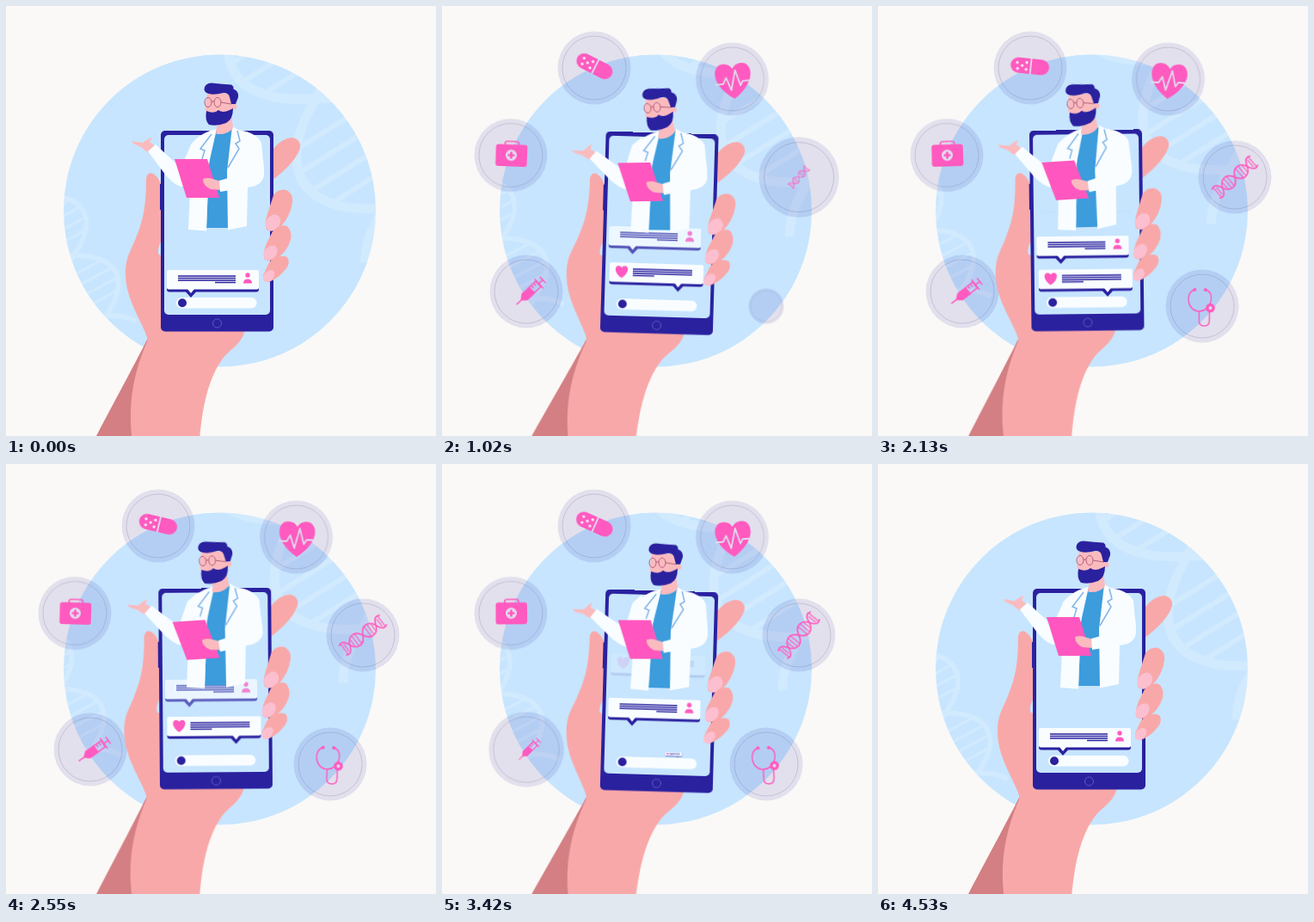
Animation of 500 by 500 pixels, one loop 4560 ms. Source, as an HTML page without scripts:

```html
<!DOCTYPE html>
<html lang="en">
<head>
<meta charset="utf-8">
<title>Online doctor</title>
<style>
  html, body { margin: 0; width: 100%; height: 100%; overflow: hidden; background: #faf9f7; }
  svg { display: block; width: 100%; height: 100%; }

  .navy { fill: #2a219f; }
  .pink { fill: #ff5abf; }
  .skin { fill: #f9a8a9; }
  .face { fill: #fabbbf; }
  .nail { fill: #fcbfd0; }
  .coat { fill: #f9fdff; }
  .pale { fill: #e0dcee; }
  .line { fill: none; stroke: #ff5abf; stroke-width: 1.7; stroke-linecap: round; stroke-linejoin: round; }
  .cut { fill: none; stroke: #e0dcee; stroke-width: 1.8; stroke-linejoin: round; }
  .text { fill: none; stroke: #2a219f; stroke-width: 1.7; }
  .seam { fill: none; stroke: #82b4e8; stroke-width: 1.5; }
  .helix { fill: none; stroke: #fff; }

  .drift, .sway, .torso, .head, .arm, .forearm, .bubble, .disc, .icon, .wobble {
    animation: 4560ms linear infinite both;
  }
  .drift { animation-name: drift; }
  .sway { animation-name: sway; animation-timing-function: ease-in-out; transform-origin: 165px 510px; }
  .torso { animation-name: torso; transform-origin: 245px 260px; }
  .head { animation-name: head; transform-origin: 255px 148px; }
  .arm { animation-name: arm; transform-origin: 215px 185px; }
  .forearm { animation-name: forearm; transform-origin: 290px 200px; }
  .bubble { animation-name: chat; animation-timing-function: ease-out; animation-delay: calc((var(--n) * 760 - 4330) * 1ms); }
  .bubble.last { animation-name: chat-last; }
  .disc { animation-name: disc; animation-timing-function: ease-in-out; animation-delay: var(--d); }
  .icon { animation-name: icon; animation-timing-function: ease-in-out; animation-delay: var(--d); }
  .wobble { animation-name: wobble; animation-timing-function: ease-in-out; animation-delay: var(--lag, 0ms); }

  @keyframes drift {
    0%, 100% { transform: none; }
    12.5% { transform: translate(calc(var(--k) * -8px), calc(var(--k) * -22px)); }
    33.5% { transform: translate(calc(var(--k) * -20px), calc(var(--k) * -40px)); }
    46.7% { transform: translate(calc(var(--k) * -30px), calc(var(--k) * -45px)); }
    63.8% { transform: translate(calc(var(--k) * -22px), calc(var(--k) * -42px)); }
    75% { transform: translate(calc(var(--k) * -22px), calc(var(--k) * -35px)); }
  }
  @keyframes sway {
    0%, 100% { transform: rotate(0deg); }
    27.4%, 31.2% { transform: rotate(1.8deg); }
    48.7% { transform: rotate(-.7deg); }
    81.1% { transform: rotate(1.8deg); }
  }
  @keyframes torso {
    0%, 12.5%, 75%, 100% { transform: rotate(0deg); }
    33.5% { transform: rotate(-2deg); }
    46.7% { transform: rotate(-1deg); }
    63.8% { transform: rotate(1deg); }
  }
  @keyframes head {
    0%, 100% { transform: rotate(0deg); }
    12.5% { transform: translate(-1px, 2px) rotate(-6.5deg); }
    33.5% { transform: translate(-1px, 2px) rotate(-7deg); }
    46.7% { transform: translate(-2px, 1px) rotate(-3.5deg); }
    63.8% { transform: translateX(-1.5px) rotate(-2.3deg); }
    75% { transform: rotate(-2deg); }
  }
  @keyframes arm {
    0%, 100% { transform: rotate(0deg); }
    12.5%, 33.5% { transform: rotate(-8deg); }
    46.7% { transform: rotate(-2deg); }
    63.8% { transform: rotate(-8.5deg); }
    75% { transform: rotate(-10deg); }
  }
  @keyframes forearm {
    0%, 100% { transform: rotate(0deg); }
    12.5% { transform: translateX(1px) rotate(-3deg); }
    33.5% { transform: rotate(0deg); }
    46.7% { transform: rotate(-2deg); }
    63.8% { transform: translate(2px, 1px) rotate(-4.5deg); }
    75% { transform: rotate(-1.5deg); }
  }
  @keyframes chat {
    0%, 2.85% { transform: translateY(0) scale(0); opacity: 1; }
    7.02%, 16.67% { transform: translateY(0) scale(1); opacity: 1; }
    20.83%, 33.33% { transform: translateY(-38.5px) scale(1); opacity: 1; }
    37.5% { transform: translateY(-91px) scale(1); opacity: .07; }
    45%, 100% { transform: translateY(-91px) scale(1); opacity: 0; }
  }
  @keyframes chat-last {
    0%, 2.85% { transform: translateY(0) scale(0); opacity: 1; }
    7.02%, 16.67% { transform: translateY(0) scale(1); opacity: 1; }
    20.83%, 22% { transform: translateY(-38.5px) scale(1); opacity: 1; }
    26% { transform: translateY(-91px) scale(1); opacity: .07; }
    28.2%, 100% { transform: translateY(-91px) scale(1); opacity: 0; }
  }
  @keyframes disc {
    0% { transform: scale(0); }
    5.7% { transform: scale(1.1); }
    10.3%, 72.6% { transform: scale(1); }
    75.2% { transform: scale(1.04); }
    79.8%, 100% { transform: scale(0); }
  }
  @keyframes icon {
    0%, 4.6% { transform: scale(0); }
    8.3% { transform: scale(1.1); }
    11%, 72.5% { transform: scale(1); }
    78%, 100% { transform: scale(0); }
  }
  @keyframes wobble {
    0%, 100% { transform: rotate(0deg); }
    24.1%, 69.3% { transform: rotate(var(--a)); }
    46.7%, 91.9% { transform: rotate(calc(var(--a) * -1)); }
  }
</style>
</head>
<body>
<svg viewBox="0 0 500 500">
  <defs>
    <clipPath id="round"><circle cx="248.5" cy="238" r="181.5"/></clipPath>

    <g id="helix" class="helix">
      <g stroke-width="11">
        <path d="M-300 0C-255 85-195 85-150 0S-45-85 0 0 105 85 150 0Q168-38 192-52"/>
        <path d="M-300 0C-255-85-195-85-150 0S-45 85 0 0 105-85 150 0Q168 38 192 52"/>
      </g>
      <path stroke-width="6" d="M-112-52V52M-87-60V60M-62-60V60M-37-52V52M38-52V52M63-60V60M88-60V60M113-52V52"/>
    </g>

    <path id="heart" d="M0 20C-26 3-23-19-10-19Q-3-19 0-13Q3-19 10-19C23-19 26 3 0 20Z"/>

    <!-- Chat bubbles have their pointer tip at 0,0 -->
    <g id="note">
      <path class="navy" d="M-28-29H79V-8.500Q79-5.500 76-5.500H6L0 1-6-5.500H-25Q-28-5.500-28-8.500Z"/>
      <rect class="coat" x="-28" y="-31" width="107" height="22.500" rx="2"/>
      <path class="coat" d="M-4-9H4L0-4Z"/>
      <path class="text" d="M-15-24H52M-15-21.500H52M-15-19H52M28-16.500H52"/>
      <circle class="pink" cx="66" cy="-25" r="2.700"/>
      <path class="pink" d="M61-15.500Q61-20.500 66-20.500T71-15.500Z"/>
    </g>
    <g id="reply">
      <path class="navy" d="M-80-29H29V-8.500Q29-5.500 26-5.500H6L0 1-6-5.500H-77Q-80-5.500-80-8.500Z"/>
      <rect class="coat" x="-80" y="-31" width="109" height="22.500" rx="2"/>
      <path class="coat" d="M-4-9H4L0-4Z"/>
      <path class="text" d="M-53-24H16M-53-21.500H16M-53-19H16M-53-16.500H-28"/>
      <use href="#heart" class="pink" transform="translate(-66 -20.500)scale(.36)"/>
    </g>

    <g id="plate">
      <circle r="42.500" fill="#1c0c96" opacity=".1"/>
      <circle r="37" fill="none" stroke="#59557f" stroke-width=".8" opacity=".28"/>
    </g>
  </defs>

  <rect width="500" height="500" fill="#faf9f7"/>
  <circle cx="248.500" cy="238" r="181.500" fill="#c7e5fe"/>
  <g clip-path="url(#round)" opacity=".2">
    <g class="drift" style="--k:1"><use href="#helix" transform="translate(360 108)rotate(58)"/></g>
    <g class="drift" style="--k:.65"><use href="#helix" transform="translate(79 290)rotate(62)scale(.53)"/></g>
  </g>

  <!-- Badges -->
  <g transform="translate(98 332)" style="--d:30ms">
    <use href="#plate" class="disc"/>
    <g class="icon"><g class="wobble" style="--a:-5deg;--lag:-4170ms"><g transform="translate(5 0)rotate(-40)scale(.88)">
      <path class="line" d="M-25 0H-16M2-5H14V5H2M6-5V-1M10-5V-1M15-8V8M15 0H22M22-5V5"/>
      <path class="pink" d="M-18 0L-11-6H3V6H-11Z"/>
    </g></g></g>
  </g>
  <g transform="translate(80 173.500)" style="--d:195ms">
    <use href="#plate" class="disc"/>
    <g class="icon"><g class="wobble" style="--a:2.500deg;--lag:-300ms">
      <path class="line" d="M-7-12V-14Q-7-16-4-16H6Q9-16 9-14V-12"/>
      <rect class="pink" x="-17.500" y="-12.500" width="36.500" height="25.500" rx="3"/>
      <circle class="pale" cx=".5" r="6.500"/>
      <path class="line" style="stroke-width:2.600;stroke-linecap:butt" d="M-3.500 0H4.500M.5-4V4"/>
    </g></g>
  </g>
  <g transform="translate(177 72)" style="--d:360ms">
    <use href="#plate" class="disc"/>
    <g class="icon"><g class="wobble" style="--a:10.500deg"><g transform="translate(0 -2)rotate(16.500)">
      <rect class="pink" x="-22.500" y="-9" width="45" height="18" rx="9"/>
      <path class="cut" d="M1-9V9"/>
      <g fill="#fff"><circle cx="-15" cy="-3" r="1.600"/><circle cx="-14" cy="4" r="1.600"/><circle cx="-9" cy="0" r="1.600"/><circle cx="-4" cy="-4" r="1.600"/><circle cx="-4" cy="4" r="1.600"/></g>
    </g></g></g>
  </g>
  <g transform="translate(337.500 85)" style="--d:530ms">
    <use href="#plate" class="disc"/>
    <g class="icon"><g class="wobble" style="--a:-5deg">
      <use href="#heart" class="pink" transform="translate(1 2)scale(1.050)"/>
      <path class="cut" d="M-20 5H-11L-7-2-2 13 4-10 9 8 12 3H22"/>
    </g></g>
  </g>
  <g transform="translate(415 199)" style="--d:730ms">
    <use href="#plate" class="disc"/>
    <g class="icon"><g class="wobble" style="--a:-7deg;--lag:-4170ms"><g class="line" transform="rotate(-44)">
      <path d="M-29-7C-25-9-22-8-19 0S-6 12 0 0 16-8 19 0 25 9 29 7"/>
      <path d="M-29 7C-25 9-22 8-19 0S-6-12 0 0 16 8 19 0 25-9 29-7"/>
      <path style="stroke-width:1.200" d="M-27-7V7M-24-5V5M-15-5V5M-11-7V7M-7-7V7M7-7V7M11-7V7M15-5V5M24-5V5M27-7V7"/>
    </g></g></g>
  </g>
  <g transform="translate(377 349)" style="--d:900ms">
    <use href="#plate" class="disc"/>
    <g class="icon"><g class="wobble" style="--a:-2deg;--lag:-4170ms"><g transform="translate(-.5 -1)">
      <path class="line" style="stroke-width:1.500" d="M-9-18C-20-14-17 7-3 7S16-14 5-18M-3 7V18Q-3 24 3 24T9 18V8"/>
      <circle class="pink" cx="-8.500" cy="-18" r="2"/><circle class="pink" cx="4" cy="-18" r="2"/>
      <circle class="pink" cx="10" cy="3" r="5.300"/><circle class="pale" cx="10" cy="3" r="2"/>
    </g></g></g>
  </g>

  <g class="sway">
    <!-- Arm and palm -->
    <path fill="#d37f83" d="M165 386C152 412 133 447 105 500L94 520H150L160 420Z"/>
    <path class="skin" d="M163 200Q165 192 171 195Q178 199 182 212V370H279C277 393 262 397 252 410C236 432 227 465 224 520H149C142 480 142 440 165 388C158 365 139 342 139 311C139 290 146 284 152 267C160 248 163 230 163 200Z"/>
    <path fill="#c7e5fe" d="M181 273Q176 281 177 288L181 291Z"/>
    <path class="skin" d="M309 168Q321 153 333 153Q343 155 342 165Q337 182 309 203Z"/>

    <!-- Phone -->
    <path class="navy" d="M179 207H182V237H179Z"/>
    <rect class="navy" x="180" y="145" width="131" height="233.500" rx="5"/>
    <rect x="184" y="150" width="123" height="209" rx="5" fill="#c7e5fe"/>
    <circle cx="245.500" cy="369" r="5" fill="none" stroke="#5f58bd"/>
    <rect class="coat" x="198" y="339" width="93.500" height="12.500" rx="6.250"/>
    <circle class="navy" cx="205" cy="345.300" r="5"/>

    <g transform="translate(215 338)">
      <use href="#note" class="bubble" style="--n:1"/>
      <use href="#note" class="bubble" style="--n:3"/>
      <use href="#note" class="bubble" style="--n:5"/>
    </g>
    <g transform="translate(269 338)">
      <use href="#reply" class="bubble" style="--n:0"/>
      <use href="#reply" class="bubble" style="--n:2"/>
      <use href="#reply" class="bubble last" style="--n:4"/>
    </g>

    <!-- Doctor -->
    <g class="torso">
      <g class="arm">
        <path class="face" d="M146 157L159 159Q165 154 170 153L167 158 175 164 168 172Q161 168 157 164L148 160Z"/>
        <path class="coat" d="M165 169L174 161 203 188 216 160 228 152 226 190Q217 208 203 210Q196 208 186 197Z"/>
      </g>
      <path fill="#3c9cdc" d="M240 148L264 142 259 200V258H233L236 185Z"/>
      <path class="coat" d="M245 143C234 145 223 151 215 161L207 188 214 215 212 260 233 261.500 236 183Z"/>
      <path class="coat" d="M263 140L270 144Q291 147 297 159L300 192Q299 207 281 211L280 256 258 260.500 257 192Z"/>
      <path class="seam" d="M239 149L226 166 231 168 228 178M269 145L272 157 267 160 271 166 258 188"/>
      <g class="head">
        <path class="face" d="M247 130L262 126 264 142Q258 150 245 149L244 147Z"/>
        <path class="face" d="M234 101L231.500 119 234 128 246 135 262 126 264 102Z"/>
        <circle class="face" cx="265" cy="117" r="3.500"/>
        <path class="navy" d="M230.500 97Q231 89.500 239 89.500Q252 91 262 91.500Q265 93 264.500 96.500Q271 99 270 106L267 114H262L260 106Q259 101 253 101Q241 104 236 102Q231 101 230.500 97Z"/>
        <path class="navy" d="M233 122Q242 126 247 121Q252 125 260 121L264 119Q264 132 256 136Q246 140 236 138Q231 133 233 122Z"/>
        <g fill="none" stroke="#b45f7c"><ellipse cx="235" cy="112" rx="4" ry="5.500"/><ellipse cx="246" cy="112" rx="4" ry="5.500"/><path d="M239 111H242M250 112L262 114"/></g>
      </g>
      <g class="forearm">
        <path fill="#ff57bf" d="M196 178H234L248 223H210Z"/>
        <path class="face" d="M229 201Q235 199 240 201L250 204V214L238 213Q229 209 229 201Z"/>
        <path class="coat" d="M248 203L281 194 299 178 300 196Q299 207 286 210L249 216Z"/>
      </g>
    </g>

    <!-- Fingertips -->
    <path class="skin" d="M311 220Q317 212 326 214Q334 218 333 228Q331 245 318 258Q308 264 303 260Q300 255 304 242Z"/>
    <ellipse class="nail" cx="310.500" cy="252" rx="8" ry="10" transform="rotate(35 310.500 252)"/>
    <path class="skin" d="M310 262Q318 253 327 256Q333 262 331 272Q326 288 312 295Q302 298 300 293Q299 284 304 274Z"/>
    <ellipse class="nail" cx="307.500" cy="287" rx="7" ry="9.500" transform="rotate(40 307.500 287)"/>
    <path class="skin" d="M306 298Q317 288 327 292Q331 298 326 305Q317 317 305 321Q298 321 299 313Z"/>
    <ellipse class="nail" cx="305.500" cy="314" rx="5.500" ry="8" transform="rotate(42 305.500 314)"/>
  </g>
</svg>
</body>
</html>
```
